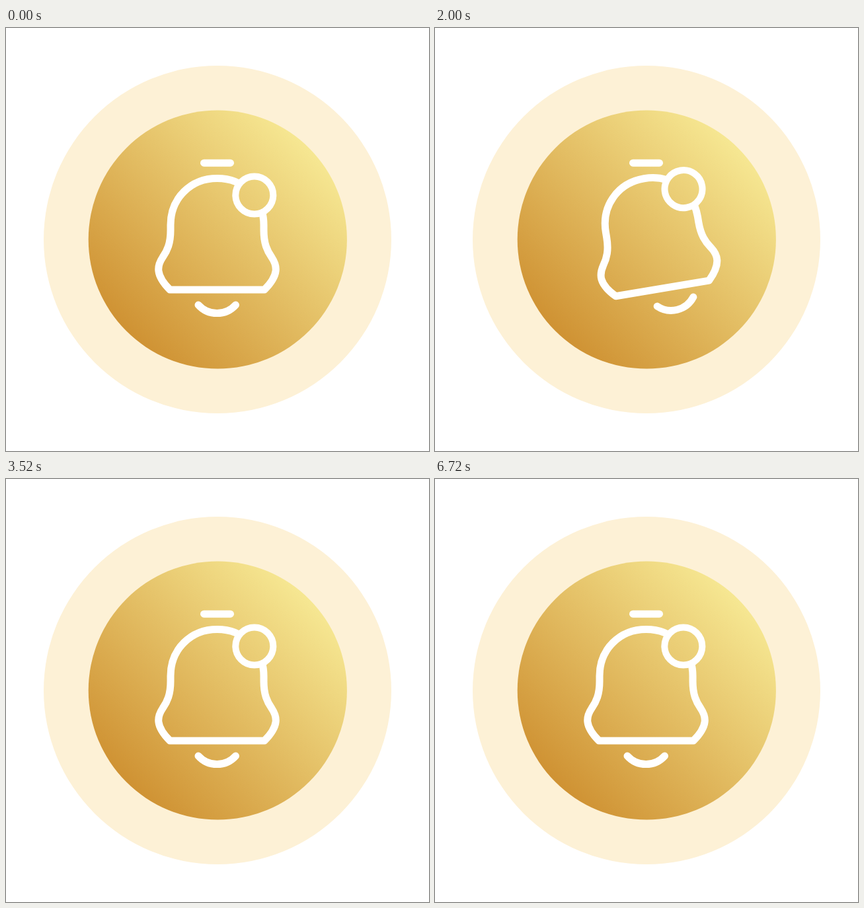
An HTML page for the animation above (6920 ms loop, 640 by 640 pixels).

```html
<!DOCTYPE html>
<html lang="en">
<head>
<meta charset="utf-8">
<title>Bell notification</title>
<style>
  html, body { margin: 0; width: 100%; height: 100%; overflow: hidden; background: #fff; }
  svg { display: block; width: 100%; height: 100%; }
  .line { fill: none; stroke: #fff; stroke-width: 11; stroke-linecap: round; stroke-linejoin: round; }
  #dot .line { stroke-width: 10; }
</style>
</head>
<body>
<svg viewBox="0 0 640 640">
  <defs>
    <linearGradient id="gold" gradientUnits="userSpaceOnUse" x1="182" y1="458" x2="458" y2="182">
      <stop offset="0" stop-color="#cf9233"/>
      <stop offset="1" stop-color="#f6e792"/>
    </linearGradient>
    <mask id="cutout" maskUnits="userSpaceOnUse" x="0" y="0" width="640" height="640">
      <rect width="640" height="640" fill="#fff"/>
      <circle id="hole" cx="375.8" cy="253" r="30"/>
    </mask>
  </defs>
  <circle cx="320" cy="320" r="263" fill="#fdf1d6"/>
  <circle cx="320.3" cy="320" r="195.6" fill="url(#gold)"/>
  <path class="line" d="M299.5 204.2H339.5"/>
  <g id="bell">
    <path class="line" mask="url(#cutout)" d="M319.5 227.5C279 227.5 249 258 249 298V306C249 326 244 337 237 347
      C229 359 225 373 248 396H391C414 373 410 359 402 347C395 337 390 326 390 306V298C390 258 360 227.5 319.5 227.5Z"/>
    <path id="clapper" class="line" d="M291 419A38 38 0 0 0 347.5 419"/>
    <g id="dot"><circle class="line" r="28.5"/></g>
  </g>
</svg>
<script>
  const LOOP = 6920, STEP = 40;
  const RING_START = 480, FIRST_PEAK = 1110, RING_END = 3520;
  const peaks = [19.4, -10.9, 11.4, -11.5, 5.5, -6.8, 3.4, 0];
  const byId = id => document.getElementById(id);
  const bell = byId('bell'), clapper = byId('clapper'), dot = byId('dot'), hole = byId('hole');

  const clamp = x => Math.min(1, Math.max(0, x));
  const ease = x => (1 - Math.cos(Math.PI * clamp(x))) / 2;
  const progress = (t, from, to) => clamp((t - from) / (to - from));

  // Counts half swings since the first peak; peak k falls at FIRST_PEAK + 260k + 5k².
  const halfSwings = t => (Math.sqrt(260 ** 2 + 20 * (t - FIRST_PEAK)) - 260) / 10;

  function bellAngle(t) {
    const k = halfSwings(t);
    if (k < 0) return peaks[0] * ease(progress(t, RING_START, FIRST_PEAK));
    const i = Math.floor(k), from = peaks[i] ?? 0, to = peaks[i + 1] ?? 0;
    return from + (to - from) * ease(k - i);
  }

  // The clapper trails the bell with its own fading swing.
  function clapperShift(t) {
    const fade = progress(t, RING_START, RING_START + 650) * (1 - progress(t, RING_END - 800, RING_END));
    return 23 * fade * Math.cos(Math.PI * (1.06 * Math.max(halfSwings(t), -0.31) + 0.33));
  }

  const dotScale = t => 1 - ease(progress(t, 3960, 4680)) + ease(progress(t, 6200, 6720));

  function draw(now) {
    const t = Math.floor((now % LOOP) / STEP) * STEP;
    const shift = clapperShift(t), scale = dotScale(t);
    bell.setAttribute('transform', `rotate(${bellAngle(t)} 319.5 247)`);
    clapper.setAttribute('transform', `translate(${shift} 0) rotate(${-0.3 * shift} 319.3 419)`);
    dot.setAttribute('transform', `translate(375.8 253) scale(${scale})`);
    hole.setAttribute('r', 30 * scale);
  }

  const start = performance.now();
  function tick() {
    draw(performance.now() - start);
    requestAnimationFrame(tick);
  }
  tick();
</script>
</body>
</html>
```
